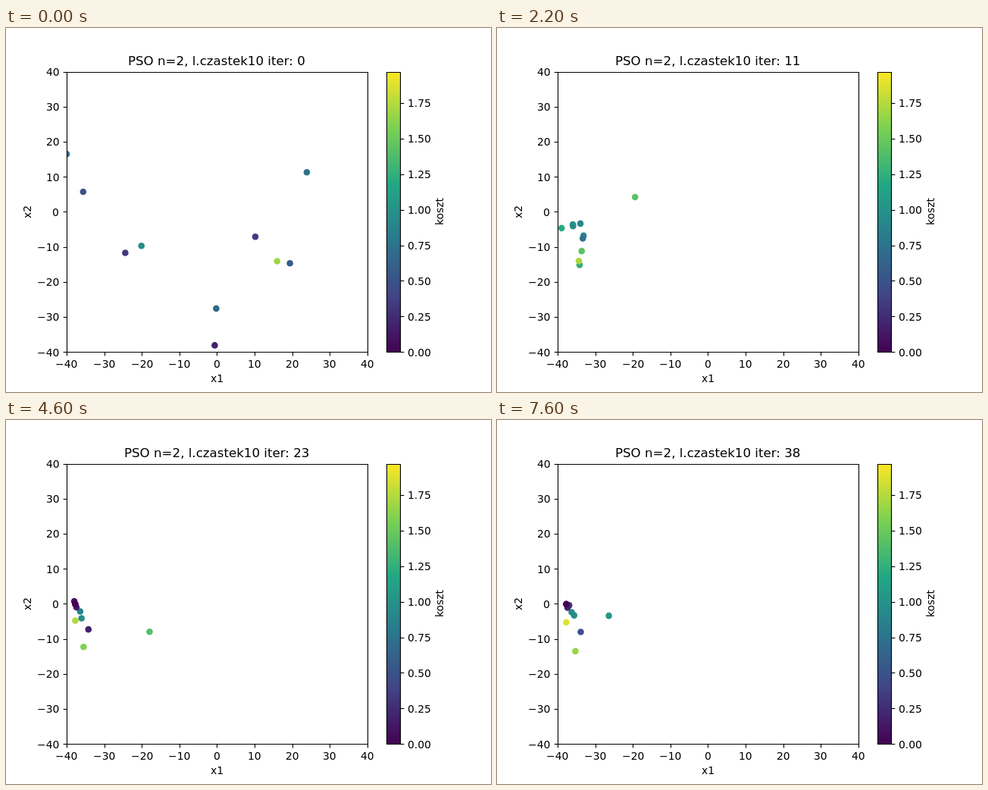
Animation, 640 px wide and 480 px high, one loop 7800 ms. Source, as an HTML page:

```html
<!DOCTYPE html>
<html lang="pl">
<head>
<meta charset="utf-8">
<title>PSO</title>
<style>
  html, body { margin: 0; width: 100%; height: 100%; overflow: hidden; background: #fff; }
  svg { display: block; }
  text { font: 13.89px "DejaVu Sans", sans-serif; fill: #000; }
  .title { font-size: 16.67px; }
  .line { fill: none; stroke: #000; stroke-width: 1.11; }
</style>
</head>
<body>
<svg id="stage" width="640" height="480" viewBox="0 0 640 480"></svg>
<script>
const STEP = 200, STEPS = 39;
const AXES = { left: 80, top: 57.6, width: 396.8, height: 369.6 };
const BOTTOM = AXES.top + AXES.height;
const MIDDLE = { x: AXES.left + AXES.width / 2, y: AXES.top + AXES.height / 2 };
const MAX_COST = 1.971;
const VIRIDIS = ['440154', '414487', '2a788e', '22a884', '7ad151', 'fde725'];

// Each particle starts, is thrown to the left, then stays at its last point.
const BEST = [-37.7, -0.1];
const KEYS = [0, 8, 14, 20, 27, 32];
const PATHS = [
  [[-40, 16.5], [-32.8, -8.1], [-39, 0], [-38.7, 1.6], [-37, -0.4]],
  [[-35.6, 5.7], [-34.2, -7.1], BEST],
  [[-24.4, -11.7], [-29.8, -11.4], [-36.4, -2.2]],
  [[-20.1, -9.7], [-31.9, -5.7], [-36, -1], [-36.2, -5], [-35.8, -3]],
  [[10.2, -7.1], [-30.4, -13.2], [-36.2, -2], [-37.4, -1]],
  [[16, -14.1], [-33, -15.1], [-34.2, -7.3]],
  [[19.4, -14.7], [-32.8, -18], [-35.5, -12.3]],
  [[23.9, 11.3], [-24.6, 5.8], [-14.2, 2.6], [-10.9, -6.3], [-27.3, -10.2], [-27.4, -3.1]],
  [[-0.2, -27.6], [-38.3, -10.2], [-39.6, 0.9], BEST],
  [[-0.6, -38.1], [-39, -32.9], [-29.7, 4.8], [-37.7, -4.8]]
];

const stage = document.getElementById('stage');

function add(name, attrs, parent = stage) {
  const node = document.createElementNS('http://www.w3.org/2000/svg', name);
  for (const key in attrs) node.setAttribute(key, attrs[key]);
  parent.appendChild(node);
  return node;
}

// Text starts on whole pixels; align is 0 for left, 0.5 for centre, 1 for right.
function write(node, content, x, y, align) {
  node.textContent = content;
  node.setAttribute('x', Math.round(x - node.getComputedTextLength() * align));
  node.setAttribute('y', Math.round(y));
}
const label = (content, x, y, align = 0.5) => write(add('text', {}), content, x, y, align);
const sideLabel = (content, x) =>
  write(add('text', { transform: 'rotate(-90)' }), content, -MIDDLE.y, x, 0.5);

const snap = v => Math.floor(v + 0.5) + 0.5;
const line = d => add('path', { d, class: 'line' });
const frame = (x0, x1) =>
  line(`M${snap(x0)} ${snap(AXES.top)}H${snap(x1)}V${snap(BOTTOM)}H${snap(x0)}Z`);
const toX = v => AXES.left + (v + 40) / 80 * AXES.width;
const toY = v => AXES.top + (40 - v) / 80 * AXES.height;
const mix = (a, b, t) => a.map((v, i) => v + (b[i] - v) * t);
const clamp = v => Math.min(Math.max(v, 0), 1);
const cost = ([x1, x2]) => 1 - Math.cos(x1) * Math.cos(x2 / 2);

function viridis(value) {
  const pos = clamp(value) * (VIRIDIS.length - 1);
  const i = Math.min(Math.floor(pos), VIRIDIS.length - 2);
  const rgb = hex => [0, 2, 4].map(c => parseInt(hex.slice(c, c + 2), 16));
  return `rgb(${mix(rgb(VIRIDIS[i]), rgb(VIRIDIS[i + 1]), pos - i).map(Math.round)})`;
}

function position(path, iter) {
  let k = 0;
  while (k < path.length - 1 && iter >= KEYS[k + 1]) k++;
  const next = path[k + 1];
  const point = next ? mix(path[k], next, (iter - KEYS[k]) / (KEYS[k + 1] - KEYS[k])) : path[k];
  // The swarm breathes around the best point once it has gathered.
  const swing = 0.1 * clamp((iter - 8) / 6) * Math.cos(Math.PI * (iter - 14) / 6);
  return mix(BEST, point, 1 + swing);
}

const defs = add('defs', {});
const clip = add('clipPath', { id: 'inside' }, defs);
add('rect', { x: AXES.left, y: AXES.top, width: AXES.width, height: AXES.height }, clip);
const ramp = add('linearGradient', { id: 'ramp', x1: 0, y1: 1, x2: 0, y2: 0 }, defs);
VIRIDIS.forEach((hex, i) =>
  add('stop', { offset: i / (VIRIDIS.length - 1), 'stop-color': '#' + hex }, ramp));

const swarm = add('g', { 'clip-path': 'url(#inside)' });
const dots = PATHS.map(() => add('circle', { r: 4.3 }, swarm));

for (let v = -40; v <= 40; v += 10) {
  const name = String(v).replace('-', '\u2212');
  const x = toX(v), y = toY(v);
  line(`M${snap(x)} ${snap(BOTTOM)}v4.86`);
  line(`M${snap(AXES.left)} ${snap(y)}h-4.86`);
  label(name, x, 448);
  label(name, 70.3, y + 5.3, 1);
}
frame(AXES.left, AXES.left + AXES.width);
label('x1', MIDDLE.x, 467);
sideLabel('x2', 33);

add('rect', { x: 502, y: 58, width: 18.5, height: 369.5, fill: 'url(#ramp)' });
for (let v = 0; v < MAX_COST; v += 0.25) {
  const y = BOTTOM - v / MAX_COST * AXES.height;
  line(`M520.5 ${snap(y)}h4.86`);
  label(v.toFixed(2), 529.8, y + 5.3, 0);
}
frame(501.6, 520.1);
sideLabel('koszt', 577);

const title = add('text', { class: 'title' });

function draw(time) {
  const iter = Math.floor(time / STEP) % STEPS;
  write(title, `PSO n=2, l.czastek10 iter: ${iter}`, MIDDLE.x, 49, 0.5);
  PATHS.forEach((path, i) => {
    const point = position(path, iter);
    dots[i].setAttribute('cx', toX(point[0]));
    dots[i].setAttribute('cy', toY(point[1]));
    dots[i].setAttribute('fill', viridis(cost(point) / MAX_COST));
  });
}

const start = performance.now();
function tick() {
  draw(performance.now() - start);
  requestAnimationFrame(tick);
}
tick();
</script>
</body>
</html>
```
